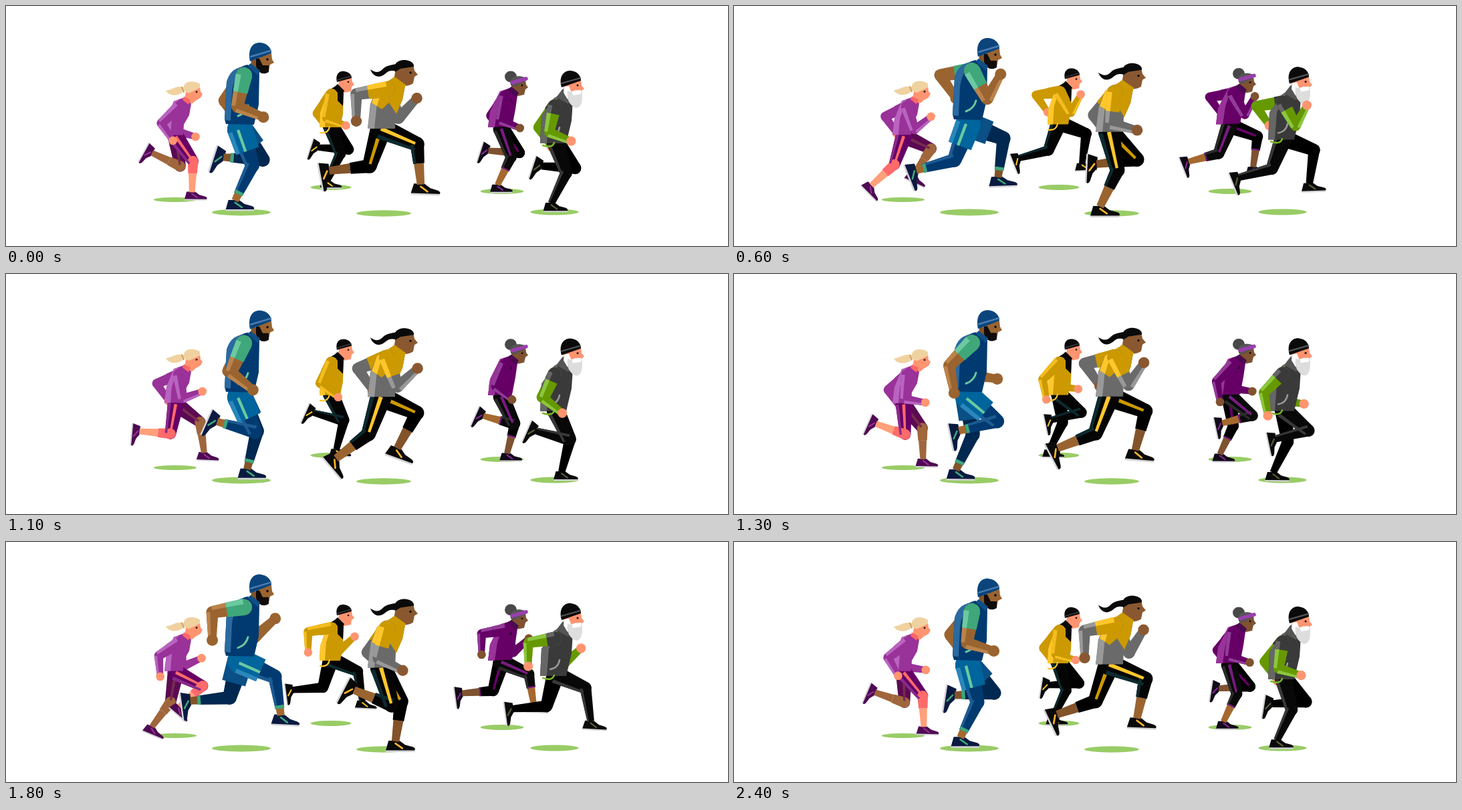
Write an HTML page with a canvas that moves like this. It is 1080 px wide and 360 px high and loops after 2500 ms.

```html
<!DOCTYPE html>
<html lang="en">
<head>
<meta charset="utf-8">
<title>Runners</title>
<style>
html, body { margin: 0; width: 100%; height: 100%; overflow: hidden; background: #fff; }
canvas { display: block; width: 1080px; height: 360px; }
</style>
</head>
<body>
<canvas id="stage" width="1080" height="360"></canvas>
<script>
const ctx = document.getElementById('stage').getContext('2d');
const LOOP = 2500, STEP = 100;
const BEAT_TIMES = [0, 600, 900, 1300, 1800, 2200, 2400];

// stride phase, then degrees: thigh, shin, foot, upper arm, forearm
const GAIT = [
  [0, 19, -26, 0, -12, 68],
  [.05, 8, -25, 0, -5, 80],
  [.11, -6, -32, 12, 3, 108],
  [.17, -18, -46, 44, 17, 127],
  [.26, -21, -77, 70, 29, 153],
  [.383, -5, -103, 108, -2, 89],
  [.436, 10, -117, 120, -10, 72],
  [.51, 41, -90, 106, -42, 24],
  [.553, 50, -76, 78, -45, 10],
  [.63, 63, -48, 40, -58, 4],
  [.755, 69, -8, -2, -82, 0],
  [.8, 66, 9, 3, -81, 0],
  [.883, 42, 6, 2, -58, 25],
  [.936, 34, -3, 0, -47, 35],
  [1, 19, -26, 0, -12, 68]
];
const STEADY = [0, .255, .383, .553, .8, .936, 1.021];

const SHADOWS = [[253, 290.5, 32, 3.6], [352, 309.5, 44, 5], [486, 272, 30.5, 4],
  [565, 311, 41, 4.7], [742, 278, 32.5, 4], [820.5, 309, 36, 4.5]];

// Paired colours are [near side, far side]; drawings are [colour, path, stroke width].
const girl = {
  beats: [-.07, .175, .275, .41, .63, .86, .905], hip: [254, 196], size: .79, bob: .5,
  shoulder: [259, 152], reach: .75,
  leg: { pants: ['#660066', '#5a0b52'], calf: ['#ff6b6b', '#a0663c'], cut: .4, skin: ['#ffa07a', '#a0663c'],
    lit: '#8a2a8a', stripe: ['#ff6b6b', '#7a2a50'], shoe: '#4e0a52', accent: '#993399' },
  arm: { sleeve: '#993299', cover: '#993299', lit: '#b964c0', skin: '#ff9470', split: .5 },
  body: [
    ['#993299', 'M251,143L268,137L277,147L274,164L266,178L265,194L237,194L240,170Z'],
    ['#b964c0', 'M251,143L258,141L248,170L246,194L237,194L240,170Z'],
    ['#ff6666', 'M253,150L264,147L268,154L257,158Z']
  ],
  head: [
    ['#f0d2a0', 'M266,122C254,119 250,126 239,127C245,137 258,135 266,129Z'],
    ['#ff9470', 'M270,124L290,121L291,129L294,132L291,138L284,142L278,147L267,140Z'],
    ['#ff6666', 'M266,136L276,141L273,148L264,141Z'],
    ['#f0d2a0', 'M266,127C263,113 278,110 290,117L290,123L273,131Z'],
    ['#c9a26a', 'M263,122L266,129', 2],
    ['#402018', 'M285,129h.1', 3]
  ]
};

const bearded = {
  beats: STEADY, hip: [350, 185], size: 1, bob: 3.5, shoulder: [356, 104], reach: 1,
  leg: { pants: ['#003a70', '#002850'], calf: ['#003a70', '#002850'], cut: .82, skin: ['#a5692f', '#83532a'],
    lit: '#1d5b93', cuff: '#3fa77a', shorts: ['#00659c', '#0a4f85'], trim: '#6cc9a0',
    shoe: '#0a1a40', accent: '#3fa77a' },
  arm: { sleeve: '#3fa77a', cover: '#9a6430', lit: '#bb834c', sleeveLit: '#6cc9a0', skin: '#9a6430', split: .55 },
  body: [
    ['#003a70', 'M361,88L379,99L378,148L371,178L329,177L327,170L330,114C335,98 348,92 361,88Z'],
    ['#2a6aa0', 'M350,92L358,91C345,104 340,112 338,130L336,172L327,171L330,114C334,100 340,95 350,92Z'],
    ['#6cc9a0', 'M347,165Q359,161 362,149', 3]
  ],
  head: [
    ['#83532a', 'M367,80L381,80L380,98L366,91Z'],
    ['#9a6430', 'M376,78L397,71L398,80L401,85L395,88L393,98L380,98Z'],
    ['#100c0c', 'M374,79L379,79L384,89L393,89L393,99C385,104 377,101 374,90Z'],
    ['#0f4f88', 'M361,90L366,86L380,97L377,104Z'],
    ['#0b457c', 'M365,83C361,64 369,54 381,55C391,56 397,63 397,71Z'],
    ['#4a7db0', 'M366,76L396,67', 2.5],
    ['#100c0c', 'M391,80h.1', 3.6]
  ]
};

const yellowMan = {
  beats: STEADY, hip: [486, 180], size: .77, bob: 2.2, shoulder: [487, 133], reach: .74,
  leg: { pants: ['#050505', '#000'], calf: ['#050505', '#000'], cut: 1, skin: ['#000', '#000'],
    lit: '#0d2b2f', shoe: '#0a0a0a', accent: '#ffc72c' },
  arm: { sleeve: '#cc9900', cover: '#cc9900', lit: '#f3bd20', skin: '#ff9470', split: .5 },
  body: [
    ['#cc9900', 'M482,126L494,121L505,132L504,162L500,182L469,182L470,160Z'],
    ['#ffc72c', 'M482,126L489,124L479,154L477,182L469,182L470,160Z'],
    ['#080808', 'M485,125L495,119L505,130L504,150L496,142L496,130Z'],
    ['#ffc72c', 'M470,190Q482,192 484,181', 2.2]
  ],
  head: [
    ['#ff9470', 'M498,112L517,107L518,114L521,118L517,121L516,128L506,130L497,123Z'],
    ['#080808', 'M491,122L496,117L506,127L503,133Z'],
    ['#0a0a0a', 'M495,114C492,101 500,97 506,98C513,99 517,103 517,108Z'],
    ['#3b3b3b', 'M496,111L516,105', 1.5],
    ['#201010', 'M512,114h.1', 2.6]
  ]
};

const sprinter = {
  beats: [.79, 1.03, 1.145, 1.235, 1.45, 1.64, 1.742], hip: [561, 189], size: 1.03, bob: 2.7,
  shoulder: [570, 130], reach: .97,
  leg: { pants: ['#050505', '#000'], calf: ['#050505', '#000'], cut: .48, skin: ['#9a6430', '#83532a'],
    lit: '#0d2b2f', stripe: ['#ffc72c', '#cc9900'], shoe: '#0a0a0a', accent: '#ffb52c' },
  arm: { sleeve: '#cc9900', cover: '#6a6a6a', lit: '#999', sleeveLit: '#ffc72c', skin: '#8a5830', split: .62 },
  body: [
    ['#6a6a6a', 'M568,119L581,113L597,125L593,146L583,166L582,189L541,189L545,152L555,128Z'],
    ['#999', 'M546,150L555,150L551,189L541,189Z'],
    ['#cc9900', 'M568,119L581,113L597,125L593,146L584,167L573,150L562,160L547,150L555,128Z'],
    ['#ffc72c', 'M568,119L574,117L560,138L555,155L547,150L555,128Z']
  ],
  head: [
    ['#0a0a0a', 'M584,92C572,94 568,95 562,101C557,106 550,104 545,100C549,112 560,114 568,106C574,101 578,102 584,103Z'],
    ['#8a5830', 'M583,99L609,92L611,102L616,108L611,111L609,121C604,125 596,125 593,125L580,116Z'],
    ['#cc9900', 'M573,117L581,111L598,123L594,131Z'],
    ['#0a0a0a', 'M582,104C578,88 590,86 597,86C606,87 611,91 610,96L590,99Z'],
    ['#100c0c', 'M605,105h.1', 3.4]
  ]
};

const purpleWoman = {
  beats: STEADY, hip: [741, 184], size: .79, bob: 2.3, shoulder: [747, 136], reach: .75,
  leg: { pants: ['#0a0a0a', '#000'], calf: ['#0a0a0a', '#000'], cut: .45, skin: ['#a5692f', '#7f5230'],
    lit: '#2b2b2b', stripe: ['#7a1a82', '#660066'], cuff: '#7a1a82', shoe: '#120a18', accent: '#8a2a9a' },
  arm: { sleeve: '#660066', cover: '#660066', lit: '#933c99', skin: '#7f5230', split: .5 },
  body: [
    ['#660066', 'M739,128L754,123L765,134L762,155L757,181L721,182L724,158Z'],
    ['#993399', 'M739,128L745,126L735,155L731,182L721,182L724,158Z'],
    ['#120a18', 'M739,137L756,137L756,143L739,143Z']
  ],
  head: [
    ['#484848', 'M746,106a9,8.5 0 1 1 18,0a9,8.5 0 1 1 -18,0Z'],
    ['#7f5230', 'M756,116L777,110L778,118L781,122L777,125L775,133L766,135L756,128Z'],
    ['#4a0a50', 'M750,125L756,121L767,130L763,137Z'],
    ['#555', 'M755,119C752,106 764,103 776,107L775,114L760,121Z'],
    ['#9a3fae', 'M757,115L778,109', 5.5],
    ['#100c0c', 'M772,119h.1', 2.8]
  ]
};

const oldMan = {
  beats: STEADY, hip: [822, 204], size: .86, bob: 2.8, shoulder: [821, 150], reach: .84,
  leg: { pants: ['#080808', '#000'], calf: ['#080808', '#000'], cut: 1, skin: ['#000', '#000'],
    lit: '#383838', shoe: '#0a0a0a', accent: '#5c5c38' },
  arm: { sleeve: '#3a3a3a', cover: '#669900', lit: '#8cc63f', sleeveLit: '#666', skin: '#ff9470', split: .3 },
  body: [
    ['#3a3a3a', 'M820,138L836,129L848,142L846,172L838,206L799,206L801,165Z'],
    ['#666', 'M820,138L827,135L812,165L809,206L799,206L801,165Z'],
    ['#999', 'M814,196Q826,194 828,182', 2.5],
    ['#7ab526', 'M803,209Q817,214 820,205', 2.5]
  ],
  head: [
    ['#ff9470', 'M834,119L860,111L861,119L865,124L860,128L843,134L834,128Z'],
    ['#555', 'M823,137L833,124L847,139L841,147Z'],
    ['#fff', 'M835,121L842,120L846,130L840,140L834,130Z'],
    ['#ddd', 'M840,127L847,130L851,126L861,127C864,142 860,153 853,153C843,150 838,139 840,127Z'],
    ['#fff', 'M846,128L860,126L860,132L848,134Z'],
    ['#0a0a0a', 'M831,122C826,104 836,96 845,97C855,98 860,105 860,112Z'],
    ['#555', 'M831,116L859,108', 2.2],
    ['#201010', 'M855,119h.1', 3]
  ]
};

const RUNNERS = [girl, yellowMan, purpleWoman, bearded, sprinter, oldMan];
for (const r of RUNNERS)
  for (const part of [...r.body, ...r.head]) part[1] = new Path2D(part[1]);

const SHOE = new Path2D('M-10,-1L6,-1L14,5L25,8Q30,10 28,13L-14,13Z');
const mix = (a, b, k) => a + (b - a) * k;
const between = (p, q, k) => [mix(p[0], q[0], k), mix(p[1], q[1], k)];
const swing = ([x, y], deg, length) => {
  const a = deg * Math.PI / 180;
  return [x + Math.sin(a) * length, y + Math.cos(a) * length];
};

function strideAt(t, beats) {
  let i = 0;
  while (i < 5 && t > BEAT_TIMES[i + 1]) i++;
  return mix(beats[i], beats[i + 1], (t - BEAT_TIMES[i]) / (BEAT_TIMES[i + 1] - BEAT_TIMES[i]));
}

function poseAt(phase) {
  const u = phase - Math.floor(phase);
  const i = GAIT.findIndex(row => row[0] > u);
  const a = GAIT[i - 1], b = GAIT[i], k = (u - a[0]) / (b[0] - a[0]);
  return a.slice(1).map((angle, n) => mix(angle, b[n + 1], k));
}

// Fills the part of a limb lying between two offsets, given as fractions of its half width.
function band(p, q, wp, wq, color, from = -1, to = 1) {
  const len = Math.hypot(q[0] - p[0], q[1] - p[1]) || 1;
  const nx = (q[1] - p[1]) / len, ny = (p[0] - q[0]) / len;
  const corner = (pt, w, s) => ctx.lineTo(pt[0] + nx * w / 2 * s, pt[1] + ny * w / 2 * s);
  ctx.fillStyle = color;
  ctx.beginPath();
  corner(p, wp, from); corner(q, wq, from); corner(q, wq, to); corner(p, wp, to);
  ctx.fill();
}

function dot([x, y], r, color) {
  ctx.fillStyle = color;
  ctx.beginPath();
  ctx.arc(x, y, r, 0, 7);
  ctx.fill();
}

function limb(p, q, wp, wq, color) {
  band(p, q, wp, wq, color);
  dot(p, wp / 2, color);
  dot(q, wq / 2, color);
}

function drawShoe([x, y], deg, size, { shoe, accent }) {
  ctx.save();
  ctx.translate(x, y);
  ctx.rotate(deg * Math.PI / 180);
  ctx.scale(size, size);
  ctx.fillStyle = '#d4d4d8';
  ctx.fillRect(-14, 12, 42, 3.5);
  ctx.fillStyle = shoe;
  ctx.fill(SHOE);
  ctx.strokeStyle = accent;
  ctx.lineWidth = 2.6;
  ctx.beginPath();
  ctx.moveTo(0, 3);
  ctx.lineTo(10, 10);
  ctx.stroke();
  ctx.restore();
}

function drawLeg(r, [thighDeg, shinDeg, footDeg], far) {
  const { leg, size: s, hip } = r;
  const knee = swing(hip, thighDeg, 57 * s), ankle = swing(knee, shinDeg, 59 * s);
  const hem = between(knee, ankle, leg.cut), hemWidth = mix(20, 12, leg.cut) * s;
  drawShoe(ankle, footDeg, s, leg);
  if (leg.cut < 1) band(hem, ankle, hemWidth * .9, 11 * s, leg.skin[far]);
  limb(hip, knee, 31 * s, 21 * s, leg.pants[far]);
  dot(knee, 10 * s, leg.calf[far]);
  band(knee, hem, 20 * s, hemWidth, leg.calf[far]);
  if (!far) {
    band(hip, knee, 31 * s, 21 * s, leg.lit, -1, -.6);
    if (leg.calf[0] === leg.pants[0]) band(knee, hem, 20 * s, hemWidth, leg.lit, -1, -.5);
  }
  if (leg.cuff) band(between(knee, hem, .9), hem, hemWidth, hemWidth, leg.cuff);
  if (leg.stripe) band(hip, between(hip, knee, .95), 31 * s, 21 * s, leg.stripe[far], -.2, .18);
  if (leg.shorts) {
    const edge = between(hip, knee, .6);
    band(hip, edge, 38, 36, leg.shorts[far]);
    dot(hip, 19, leg.shorts[far]);
    if (!far) {
      band(hip, edge, 38, 36, '#2a86bb', -1, -.65);
      band(hip, edge, 38, 36, leg.trim, -.28, -.05);
    }
  }
}

function drawArm(r, [, , , upperDeg, foreDeg], far) {
  const { arm, reach: s, shoulder } = r;
  // The far forearm always stays tucked towards the chest.
  const bend = far ? Math.max(foreDeg, 34) : foreDeg;
  const elbow = swing(shoulder, upperDeg, 48 * s), hand = swing(elbow, bend, 42 * s);
  const cuff = between(shoulder, elbow, arm.split), cuffWidth = mix(25, 19, arm.split) * s;
  limb(shoulder, elbow, 24 * s, 18 * s, arm.cover);
  band(elbow, hand, 18 * s, 12 * s, arm.cover);
  dot(shoulder, 12 * s, arm.sleeve);
  band(shoulder, cuff, 25 * s, cuffWidth, arm.sleeve);
  if (!far) {
    band(cuff, elbow, cuffWidth, 18 * s, arm.lit, -1, -.35);
    band(elbow, hand, 18 * s, 12 * s, arm.lit, -1, -.35);
    band(shoulder, cuff, 25 * s, cuffWidth, arm.sleeveLit || arm.lit, -1, -.35);
  }
  dot(hand, 8.5 * s, arm.skin);
}

function paint(parts) {
  for (const [color, path, width] of parts) {
    ctx.fillStyle = ctx.strokeStyle = color;
    ctx.lineWidth = width || 1;
    width ? ctx.stroke(path) : ctx.fill(path);
  }
}

function drawRunner(r, t) {
  const phase = strideAt(t, r.beats);
  const near = poseAt(phase), far = poseAt(phase + .5);
  ctx.save();
  ctx.translate(0, -r.bob * (1 - Math.cos(4 * Math.PI * phase)));
  drawArm(r, far, 1);
  drawLeg(r, far, 1);
  drawLeg(r, near, 0);
  paint(r.body);
  paint(r.head);
  drawArm(r, near, 0);
  ctx.restore();
}

function frame(now) {
  const t = Math.floor(now % LOOP / STEP) * STEP;
  ctx.fillStyle = '#fff';
  ctx.fillRect(0, 0, 1080, 360);
  ctx.lineCap = 'round';
  ctx.fillStyle = '#99cc66';
  for (const [x, y, rx, ry] of SHADOWS) {
    ctx.beginPath();
    ctx.ellipse(x, y, rx, ry, 0, 0, 7);
    ctx.fill();
  }
  for (const r of RUNNERS) drawRunner(r, t);
  requestAnimationFrame(frame);
}
requestAnimationFrame(frame);
</script>
</body>
</html>
```
